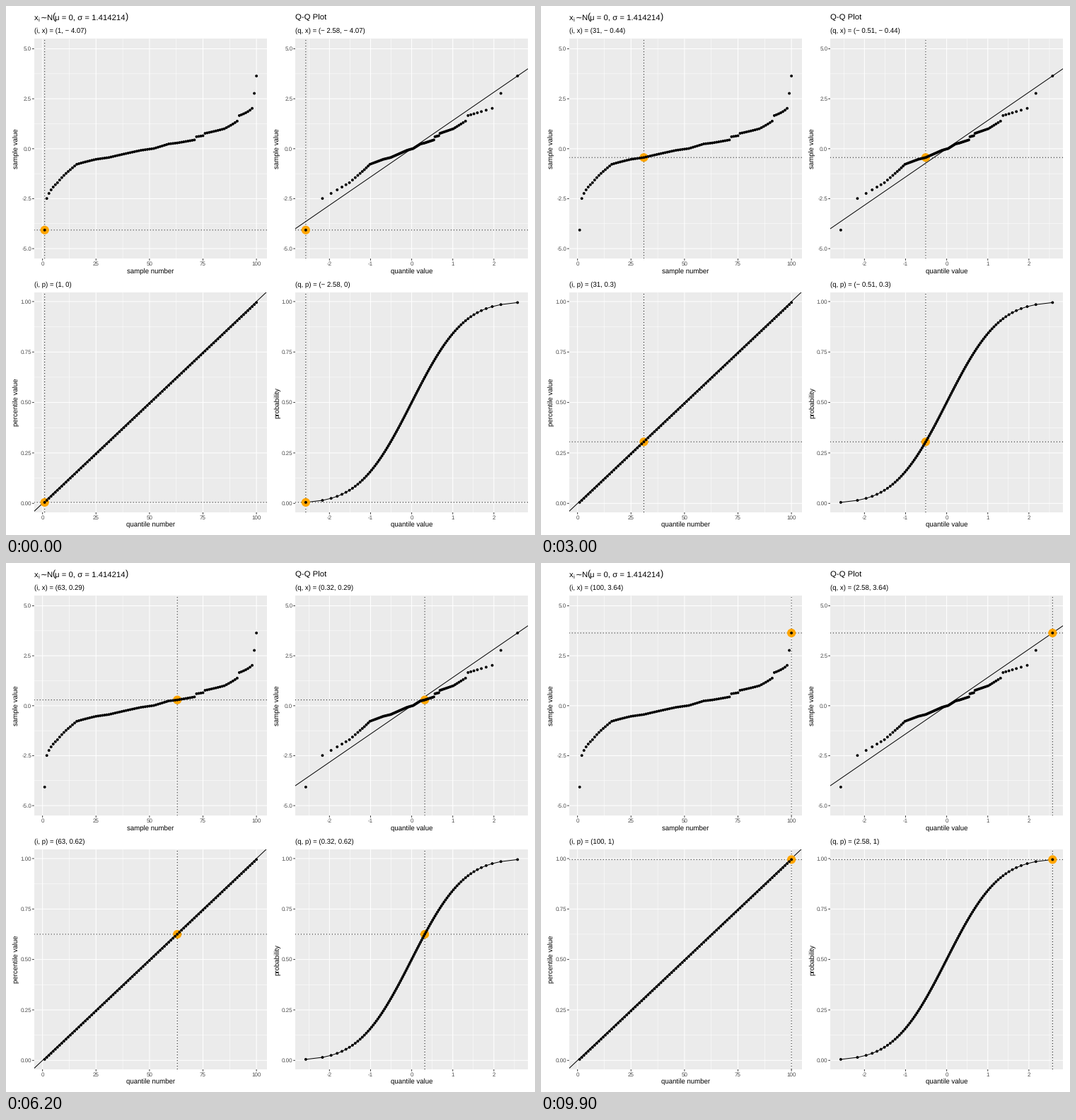
A matplotlib script that plays this animation: 748x748 px, repeating every 10000 ms.

```python
import math
from itertools import product

import matplotlib.pyplot as plt
import numpy as np
from matplotlib.animation import FuncAnimation
from matplotlib.patches import Circle, Rectangle

SIZE, DPI = 748, 64
PT = 72 / DPI                      # points per pixel
N = 100
LEFT, TOP = 39.7, 46.4             # first panel corner
STEP_X, STEP_Y = 369.2, 358.8      # panel spacing
PANEL_W, PANEL_H = 329.4, 310.8

plt.rcParams.update({"font.family": "Liberation Sans",
                     "text.hinting": "none"})

rank = np.arange(1, N + 1)
prob = (rank - 0.5) / N
z = np.linspace(-4, 4, 8001)
cdf = [0.5 * (1 + math.erf(v / math.sqrt(2))) for v in z]
quant = np.interp(prob, cdf, z)

# Heavy-tailed sorted sample: piecewise linear over normal quantiles
KEYS = [(1, -4.07), (2, -2.49), (7, -1.7), (13, -1.05), (16, -0.78),
        (25, -0.53), (31, -0.44), (46, -0.08), (52, 0.01), (59, 0.24),
        (63, 0.29), (71, 0.44), (72, 0.6), (75, 0.65), (76, 0.77), (85, 1.0),
        (91, 1.38), (92, 1.66), (98, 2.02), (99, 2.77), (100, 3.64)]
sample = np.interp(quant, [quant[r - 1] for r, _ in KEYS],
                   [v for _, v in KEYS])

fig = plt.figure(figsize=(SIZE / DPI, SIZE / DPI), dpi=DPI, facecolor="white")
ax = fig.add_axes([0, 0, 1, 1])
ax.set(xlim=(0, SIZE), ylim=(SIZE, 0))
ax.axis("off")


def text(x, y, s, size=9.6, color="black", **kw):
    return ax.text(x, y, s, fontsize=size * PT, color=color,
                   va="baseline", **kw)


def number(v):
    return f"{round(float(v), 2) + 0.0:g}".replace("-", "\u2212 ")


class Axis:
    def __init__(self, name, values, ticks, fmt, lim=None, shown=None):
        self.name, self.values = name, values
        self.ticks, self.fmt = ticks, fmt
        pad = 0.05 * (values[-1] - values[0])
        self.lim = lim or (values[0] - pad, values[-1] + pad)
        self.shown = values if shown is None else shown

    def scale(self, v):
        lo, hi = self.lim
        return (np.asarray(v) - lo) / (hi - lo)

    def minor(self):
        step = self.ticks[1] - self.ticks[0]
        return np.arange(self.ticks[0] - step / 2, self.ticks[-1] + step, step)


class Panel:
    def __init__(self, col, row, xa, ya, xlabel, ylabel):
        self.xa, self.ya = xa, ya
        self.left, self.top = LEFT + col * STEP_X, TOP + row * STEP_Y
        self.right, self.bottom = self.left + PANEL_W, self.top + PANEL_H
        self.box = Rectangle((self.left, self.top), PANEL_W, PANEL_H,
                             fc="#EBEBEB", ec="none", zorder=0)
        ax.add_patch(self.box)
        self.grid()
        self.labels(xlabel, ylabel)

        # one size per dot keeps them off the pixel grid
        ax.scatter(self.px(xa.values), self.py(ya.values),
                   s=np.full(N, (3.9 * PT) ** 2), c="black",
                   linewidths=0, zorder=6)
        dotted = dict(ls=(0, (1, 3)), zorder=4, snap=False)
        self.vline = self.line([0, 0], [self.bottom, self.top], **dotted)
        self.hline = self.line([self.left, self.right], [0, 0], **dotted)
        self.mark = Circle((0, 0), 6.1, fc="orange", ec="none", zorder=5)
        ax.add_patch(self.mark)
        self.caption = text(self.left + 0.3, self.top - 8.4, "")

    def px(self, v):
        return self.left + self.xa.scale(v) * PANEL_W

    def py(self, v):
        return self.bottom - self.ya.scale(v) * PANEL_H

    def line(self, x, y, color="black", lw=1.0, **kw):
        ln, = ax.plot(x, y, color=color, lw=lw * PT,
                      solid_capstyle="butt", dash_capstyle="butt", **kw)
        ln.set_clip_path(self.box)
        return ln

    def curve(self, x, y):
        self.line(self.px(x), self.py(y), zorder=3)

    def grid(self):
        for xs, ys, lw in ((self.xa.minor(), self.ya.minor(), 0.53),
                           (self.xa.ticks, self.ya.ticks, 1.07)):
            style = dict(color="white", lw=lw, zorder=1 + lw, snap=False)
            for x in self.px(xs):
                self.line([x, x], [self.top, self.bottom], **style)
            for y in self.py(ys):
                self.line([self.left, self.right], [y, y], **style)

    def labels(self, xlabel, ylabel):
        tick = dict(color="#333333", lw=PT, solid_capstyle="butt", snap=False)
        small = dict(size=8, color="#4D4D4D")
        for v, x in zip(self.xa.ticks, self.px(self.xa.ticks)):
            ax.plot([x, x], [self.bottom, self.bottom + 2.6], **tick)
            text(x, self.bottom + 10.2, format(v, self.xa.fmt), ha="center",
                 **small)
        for v, y in zip(self.ya.ticks, self.py(self.ya.ticks)):
            ax.plot([self.left - 2.6, self.left], [y, y], **tick)
            text(self.left - 3.6, y + 2.8, format(v, self.ya.fmt), ha="right",
                 **small)
        text(self.left + PANEL_W / 2, self.bottom + 20.4, xlabel, ha="center")
        text(self.left - 22.9, self.top + PANEL_H / 2, ylabel, ha="center",
             rotation=90, rotation_mode="anchor")

    def select(self, k):
        xa, ya = self.xa, self.ya
        x, y = float(self.px(xa.values[k])), float(self.py(ya.values[k]))
        self.vline.set_xdata([x, x])
        self.hline.set_ydata([y, y])
        self.mark.center = x, y
        self.caption.set_text(f"({xa.name}, {ya.name}) = "
                              f"({number(xa.shown[k])}, {number(ya.shown[k])})")


columns = (Axis("i", rank, np.arange(0, 101, 25), "g"),
           Axis("q", quant, np.arange(-2, 3), "g"))
rows = (Axis("x", sample, np.arange(-5, 5.1, 2.5), ".1f", lim=(-5.5, 5.5)),
        Axis("p", prob, np.arange(0, 1.01, 0.25), ".2f",
             shown=np.round(rank - 0.5) / N))      # halves go to even
xlabels = ("sample number", "quantile value",
           "quantile number", "quantile value")
ylabels = ("sample value", "sample value", "percentile value", "probability")

panels = [Panel(c, r, columns[c], rows[r], xl, yl)
          for (r, c), xl, yl in zip(product(range(2), repeat=2),
                                    xlabels, ylabels)]
_, qq, ranks, normal = panels

ends = np.array([-3, 3])
qq.curve(ends, math.sqrt(2) * ends)
ends = np.array([-10, 110])
ranks.curve(ends, ends / N)
normal.curve(quant, prob)

# Plot titles
BASE, BIG = 19.6, 11.4
text(40, BASE, "x", BIG)
text(45.8, BASE + 2, "i", 8)
text(49.2, BASE, "\u223c", BIG, family="DejaVu Sans")
text(57, BASE, "N", BIG)
text(65, BASE, "(", 12.6)
text(69.3, BASE, "\u03bc = 0, \u03c3 = 1.414214", BIG)
text(169, BASE, ")", 12.6)
text(409, BASE, "Q-Q Plot", BIG)


def update(k):
    for p in panels:
        p.select(k)
    return []


anim = FuncAnimation(fig, update, frames=N, interval=100, repeat=True,
                     repeat_delay=0, blit=False)
plt.show()
```
